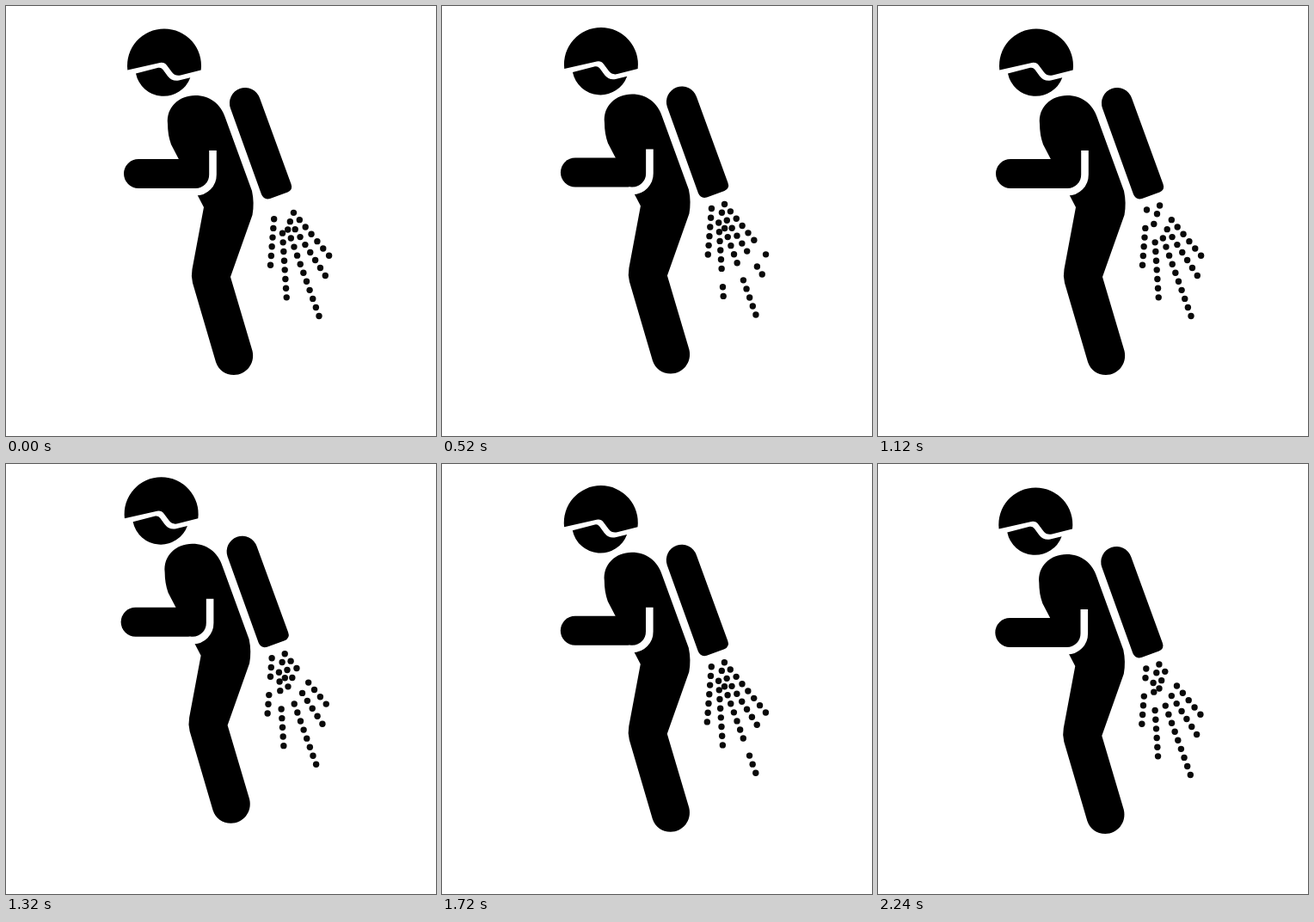
An HTML page that plays this animation: 500 by 500 pixels, repeating every 2.28 s.

```html
<!DOCTYPE html>
<html lang="en">
<head>
<meta charset="utf-8">
<title>Jetpack</title>
<style>
  html, body { margin: 0; width: 100%; height: 100%; overflow: hidden; background: #fff; }
  svg { display: block; width: 100vw; height: 100vh; }
</style>
</head>
<body>
<svg viewBox="0 0 500 500">
  <g id="flyer">
    <!-- helmet, face, tank -->
    <path d="M141.3 74.5A43 43 0 1 1 226.7 74.5L203 80.5Q197 82 193 77L187 69Q184 65 179 66Z"/>
    <path d="M151 78.5L177 71.8Q180 71 182.5 74L188 81.5Q193 88 201 86.5L214.3 83.2A33 33 0 0 1 151 78.5Z"/>
    <path d="M261 119A18 18 0 0 1 295 107L331.5 207Q334 213.5 327.5 216.5L307 224Q300 226 297 219Z"/>
    <!-- body, arm, elbow gap -->
    <path d="M188 137C186 118 201 104 220 104C237 104 250 114 255 130L286 215Q289 229 286.5 243L261 315L286.5 401C290 416 279 429 265 429C255 429 247 423 244 414L217 322Q215 314 216.5 306L230 234L192 161Q188 150 188 137Z"/>
    <path d="M154 178H236V212H154A17 17 0 0 1 154 178Z"/>
    <path d="M240.5 168V196A20 20 0 0 1 220.5 216.3H216" fill="none" stroke="#fff" stroke-width="8.6"/>
    <g id="spray" fill="#0a0a0a"></g>
  </g>
</svg>
<script>
const LOOP = 2280, FRAME = 40, SPRAY_STEP = 80, SPRAY_CYCLE = 13;

// Each jet: start, step, number of dots, delay of the travelling gap
const jets = [
  { x: 312.5, y: 237, dx: -0.83, dy: 10.7, count: 7, delay: 0 },
  { x: 320.8, y: 253.5, dx: 0.68, dy: 10.67, count: 9, delay: 0 },
  { x: 327.7, y: 260, dx: 3.63, dy: 10.05, count: 11, delay: 1 },
  { x: 324.5, y: 241.7, dx: 5.85, dy: 8.97, count: 9, delay: 0 },
  { x: 327.6, y: 232, dx: 6.86, dy: 8.33, count: 8, delay: 0 }
];

// Hover keys: [time, offset]
const swayX = [[0, 0], [240, -5], [540, 1], [740, -5.8], [1120, 0],
  [1420, -4.5], [1700, 1], [1920, -9], [2240, -0.7], [2280, 0]];
const swayY = [[0, 0], [240, -12.5], [600, 0], [830, -11], [1120, 0],
  [1360, -12], [1660, 0], [1940, -12], [2240, 1], [2280, 0]];

function ease(keys, t) {
  const i = keys.findIndex(key => key[0] > t);
  const [t0, v0] = keys[i - 1], [t1, v1] = keys[i];
  const p = (1 - Math.cos(Math.PI * (t - t0) / (t1 - t0))) / 2;
  return v0 + (v1 - v0) * p;
}

const flyer = document.getElementById('flyer');
const spray = document.getElementById('spray');
const dots = [];
for (const jet of jets) {
  for (let i = 0; i < jet.count; i++) {
    const el = document.createElementNS('http://www.w3.org/2000/svg', 'circle');
    el.setAttribute('cx', jet.x + jet.dx * i);
    el.setAttribute('cy', jet.y + jet.dy * i);
    el.setAttribute('r', 3.7);
    spray.append(el);
    dots.push({ el, turn: i + jet.delay });
  }
}

function draw(now) {
  const t = Math.floor((now % LOOP) / FRAME) * FRAME;
  const gap = Math.floor(t / SPRAY_STEP) % SPRAY_CYCLE;
  flyer.setAttribute('transform', `translate(${ease(swayX, t)} ${ease(swayY, t)})`);
  for (const { el, turn } of dots) {
    el.setAttribute('visibility', turn === gap ? 'hidden' : 'visible');
  }
}

const start = performance.now();
function tick() {
  draw(performance.now() - start);
  requestAnimationFrame(tick);
}
tick();
</script>
</body>
</html>
```
